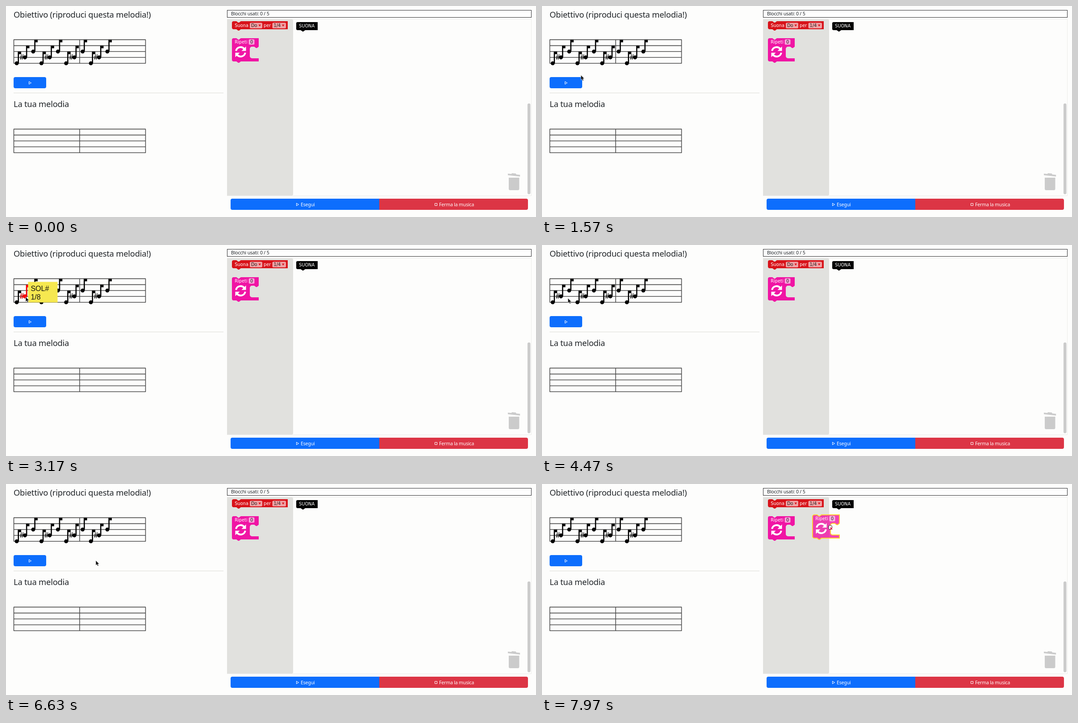
Recreate the animation shown at these times as an HTML page. Size 1187 by 472 pixels, loop 8000 ms.

```html
<!DOCTYPE html>
<html lang="it">
<head>
<meta charset="utf-8">
<title>Melodia a blocchi</title>
<style>
  html, body { margin: 0; width: 100%; height: 100%; overflow: hidden; background: #fdfdfc; }
  svg { display: block; width: 100vw; height: 100vh; }
  .head { font: 500 18.4px "Noto Sans", sans-serif; letter-spacing: -.25px; fill: #212529; }
  .ui { font: 10.6px "Noto Sans", sans-serif; letter-spacing: -.2px; fill: #212529; }
  .block { font: 9.8px "DejaVu Sans", sans-serif; fill: #fff; }
  .block .val { fill: #222; }
  .field { fill: #fff; fill-opacity: .6; }
  .sharp, .tip { font: 16px "Liberation Sans", sans-serif; }
  .tip { fill: #111; }
  .white { fill: #fff; }
  .outline { fill: none; stroke: #fff; stroke-width: 1; }

  .hover, .show { opacity: 0; animation: 8s step-end infinite; }
  #mi { animation-name: mi; }
  #sol { animation-name: sol; }
  #si { animation-name: si; }
  #arrow { animation-name: arrow; }
  #hand { animation-name: hand; }
  #cross, #drag { animation-name: drag; }
  #pointer { animation: point 8s linear infinite; }
  #lift { animation: lift 8s linear infinite; }

  @keyframes mi { 0% { opacity: 0 } 26.5% { opacity: 1 } 35.5%, 100% { opacity: 0 } }
  @keyframes sol { 0% { opacity: 0 } 38% { opacity: 1 } 50%, 100% { opacity: 0 } }
  @keyframes si { 0% { opacity: 0 } 58% { opacity: 1 } 74.2%, 100% { opacity: 0 } }
  @keyframes arrow { 0% { opacity: 1 } 91%, 100% { opacity: 0 } }
  @keyframes hand { 0% { opacity: 0 } 91%, 100% { opacity: 1 } }
  @keyframes drag { 0% { opacity: 0 } 97.7%, 100% { opacity: 1 } }
  @keyframes point {
    0%, 6% { transform: translate(330px, 490px); animation-timing-function: ease-out }
    10.6%, 11.8% { transform: translate(305px, 191px); animation-timing-function: ease-in-out }
    22% { transform: translate(60px, 150px) }
    25% { transform: translate(32px, 135px) }
    28.3%, 33.75% { transform: translate(27px, 131px); animation-timing-function: ease-in-out }
    39.6%, 44.1% { transform: translate(44px, 116px) }
    50% { transform: translate(46px, 121px) }
    54% { transform: translate(52px, 124px) }
    55.875% { transform: translate(58px, 119px) }
    58.75% { transform: translate(63px, 103px) }
    60%, 73.75% { transform: translate(63px, 104px); animation-timing-function: ease-in-out }
    80%, 82.8% { transform: translate(201px, 171px); animation-timing-function: ease-in-out }
    92.1% { transform: translate(526px, 99px) }
    93.4%, 97.5% { transform: translate(522px, 98px) }
    99.625%, 100% { transform: translate(645px, 97px) }
  }
  @keyframes lift {
    0%, 97.7% { transform: translate(0, 0) }
    99.625%, 100% { transform: translate(100px, -3px) }
  }
</style>
</head>
<body>
<svg viewBox="0 0 1187 472">
  <defs>
    <path id="loopShape" d="M506 76a4 4 0 0 1 4-4h6l4 3h2l4-3H566V91l-4 3h-2l-4-3h-5a5 5 0 0 0-5 5V112a5 5 0 0 0 5 5H566V124H526l-4 3h-2l-4-3h-6a4 4 0 0 1-4-4z"/>
    <g id="turn">
      <path d="M-10.3-2A10.4 10.4 0 0 1 7.8-6.9" fill="none" stroke="#fff" stroke-width="4"/>
      <path class="white" d="M12-12V-2H2z"/>
    </g>
    <g id="loopFace" class="block">
      <text x="512.3" y="83.5">Ripeti</text>
      <rect class="field" x="543.5" y="74.5" width="13" height="12" rx="2.5"/>
      <text class="val" x="547" y="83.5">0</text>
      <use href="#turn" x="0" y="0" transform="translate(525.5 102.5)"/>
      <use href="#turn" transform="translate(525.5 102.5) rotate(180)"/>
    </g>
  </defs>

  <rect width="1187" height="472" fill="#fdfdfc"/>

  <text class="head" x="17" y="26">Obiettivo (riproduci questa melodia!)</text>
  <text class="head" x="17" y="226">La tua melodia</text>
  <path d="M17 194.5H487" stroke="#dcdcd6"/>
  <rect x="17" y="159" width="73" height="25" rx="4" fill="#0d6efd"/>
  <path class="outline" d="M51.5 169v6l5-3z"/>
  <g id="score"></g>

  <rect x="495.5" y="9.5" width="681" height="16" fill="#fefefe" stroke="#2c2c2e"/>
  <text class="ui" x="504" y="21">Blocchi usati: 0 / 5</text>

  <path d="M495 29.5H1176.5V424.5H495" fill="none" stroke="#ececea"/>
  <path d="M495 30H640a3 3 0 0 1 3 3V421a3 3 0 0 1-3 3H495z" fill="#e1e1de"/>
  <rect x="1168" y="218" width="6.5" height="203" rx="3.2" fill="#cbcbcb"/>
  <g fill="#cbcbcb">
    <path d="M1124 375l8 .8 1-1.8 9 .8.7 2 8.5 1v3.6l-27.2-3z"/>
    <path d="M1126 384h23.5v25a3 3 0 0 1-3 3h-17.5a3 3 0 0 1-3-3z"/>
  </g>

  <g class="block">
    <path fill="#d8131a" d="M506 38a4 4 0 0 1 4-4h6l4 3h2l4-3H631V52H526l-4 3h-2l-4-3h-6a4 4 0 0 1-4-4z"/>
    <rect class="field" x="546" y="37.5" width="28" height="12.5" rx="2.5"/>
    <rect class="field" x="596.5" y="37.5" width="30.5" height="12.5" rx="2.5"/>
    <text x="512.3" y="47">Suona</text>
    <text class="val" x="549" y="47">Do</text>
    <text x="577" y="47">per</text>
    <text class="val" x="599.5" y="47">1/4</text>
    <path fill="#d8131a" d="M565.5 41.5h5.4l-2.7 4.6zM618 41.5h5.4l-2.7 4.6z"/>
  </g>
  <use href="#loopShape" fill="#f015a4"/>
  <use href="#loopFace"/>

  <g class="block">
    <path fill="#000" d="M650 39a3 3 0 0 1 3-3H698V54H670l-4 3h-2l-4-3h-7a3 3 0 0 1-3-3z"/>
    <text x="656" y="48.3">SUONA</text>
  </g>

  <path fill="#0d6efd" d="M836 431H507a4 4 0 0 0-4 4V452a4 4 0 0 0 4 4H836z"/>
  <path fill="#dc3545" d="M836 431H1165a4 4 0 0 1 4 4V452a4 4 0 0 1-4 4H836z"/>
  <path class="outline" d="M650.5 441v6l5-3zM960.5 441.500h5v5h-5z"/>
  <text class="ui white" x="660" y="447.500" style="fill:#fff">Esegui</text>
  <text class="ui white" x="970" y="447.500" style="fill:#fff">Ferma la musica</text>

  <g id="drag" class="show">
    <g id="lift">
      <use href="#loopShape" fill="#f015a4" fill-opacity=".8" stroke="#fc3" stroke-width="2"/>
      <use href="#loopFace"/>
    </g>
  </g>

  <g id="pointer">
    <path id="arrow" class="show" d="M0 0V11L2.500 8.800 4.300 12.600 6.200 11.700 4.500 8H7.800z" fill="#111" stroke="#fff" stroke-width=".6"/>
    <g id="hand" class="show">
      <path d="M-3-2.500q0-1.800 1.400-1.500 1.200-1.200 2.300-.2 1.500-.7 2.200.5 1.500-.1 1.500 1.400V1L2.500 4.500H-1.500L-4 1q0-1.600 1.300-1z" fill="#fff" stroke="#111" stroke-width=".9"/>
      <path id="cross" class="show" d="M.500.200l4.600 4.600M5.100.200L.500 4.800" stroke="#d8133c" stroke-width="1.500"/>
    </g>
  </g>
</svg>
<script>
  const GAP = 13.2, BASE = 128.2;
  const noteX = i => 24 + i * 18.45;
  const noteY = i => BASE - (i % 3) * GAP;

  function staff(top) {
    let d = "";
    for (let i = 0; i < 5; i++) d += `M17 ${top + i * GAP}H313`;
    for (const x of [17.5, 165, 312.5]) d += `M${x} ${top}v${4 * GAP}`;
    return `<path d="${d}" fill="none" stroke="#4d4d4d" stroke-width="1.6"/>`;
  }

  function note(i, color) {
    const x = noteX(i), y = noteY(i);
    const sharp = i % 3 === 1
      ? `<text class="sharp" x="${x - 11.5}" y="${y + 5}" stroke="${color}" stroke-width=".3">#</text>` : "";
    return `<g fill="${color}"><circle cx="${x}" cy="${y}" r="4.4"/>
      <path d="M${x + 2.4} ${y}v-26h7.6v5.500h-5v20.500z"/>${sharp}</g>`;
  }

  function hover(i, id, name) {
    const x = noteX(i) + 7, y = noteY(i) - 32.500;
    return `<g class="hover" id="${id}">${note(i, "#f00")}
      <rect x="${x}" y="${y}" width="66" height="46" fill="#f6e850"/>
      <text class="tip" x="${x + 6}" y="${y + 20}">${name}</text>
      <text class="tip" x="${x + 6}" y="${y + 39.500}">1/8</text></g>`;
  }

  let score = staff(75.4) + staff(275.4);
  for (let i = 0; i < 12; i++) score += note(i, "#000");
  score += hover(0, "mi", "MI") + hover(1, "sol", "SOL#") + hover(2, "si", "SI");
  document.getElementById("score").innerHTML = score;
</script>
</body>
</html>
```
